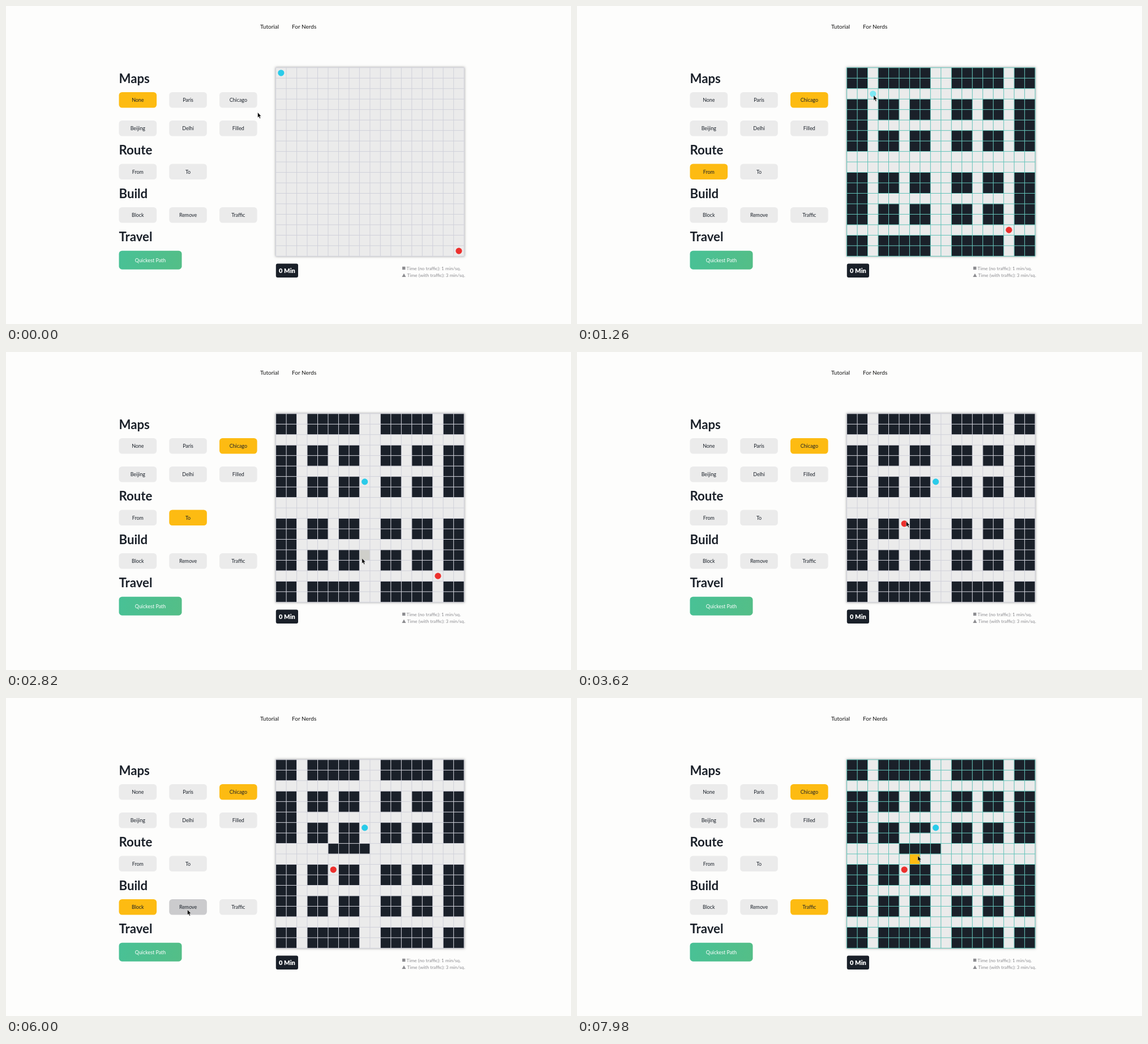
Recreate the animation shown at these times as an HTML page with a canvas. Size 998 px wide and 561 px high, loop 8 s.

```html
<!DOCTYPE html>
<html lang="en">
<head>
<meta charset="utf-8">
<title>Quickest path</title>
<style>
  html, body { margin: 0; width: 100%; height: 100%; overflow: hidden; background: #fdfdfc; }
  canvas { display: block; }
</style>
</head>
<body>
<canvas id="stage" width="998" height="561"></canvas>
<script>
const ctx = document.getElementById('stage').getContext('2d');
const LOOP = 8000;
const INK = '#1a2029', YELLOW = '#fdbb12', GRAY = '#ebebeb';
const BOARD = { x: 476.6, y: 108.8, cells: 18, cell: 18.475 };
const SIZE = BOARD.cells * BOARD.cell;

const headings = [['Maps', 136], ['Route', 262.4], ['Build', 338.8], ['Travel', 415.4]];
const rows = [
  [152, ['None', 'Paris', 'Chicago']],
  [202, ['Beijing', 'Delhi', 'Filled']],
  [278.5, ['From', 'To']],
  [355, ['Block', 'Remove', 'Traffic']]
];
const buttons = rows.flatMap(([y, names]) =>
  names.map((name, i) => ({ name, x: 199.5 + i * 88.75, y, w: 66.6, h: 27.6 })));

const MAP_CLICK = 520;
const tools = [
  { name: 'From', on: 960, press: 1240, release: 1960, off: 1960 },
  { name: 'To', on: 2560, press: 3020, release: 3560, off: 3560 },
  { name: 'Block', on: 4280, press: 4800, release: 5340, off: 6060 },
  { name: 'Remove', on: 6060, press: 6540, release: 6860, off: 7380 },
  { name: 'Traffic', on: 7380, press: 7900, release: LOOP, off: LOOP }
];

// Pointer stops: [arrive, leave, x, y]
const stops = [
  [0, 160, 444.6, 187.8], [420, 560, 412, 165], [880, 980, 233, 293],
  [1210, 1290, 524, 157.5], [1900, 2120, 632, 229], [2480, 2580, 321, 293],
  [2960, 3060, 763, 395], [3500, 3660, 581.6, 299], [4180, 4300, 232, 370],
  [4700, 4820, 577.5, 264.5], [5300, 5400, 634, 265], [5880, 6100, 320.5, 373.5],
  [6500, 6560, 596, 246], [6800, 6880, 615, 246], [7300, 7400, 410, 370],
  [7860, 7900, 594, 280], [7980, LOOP, 602, 278.5]
];

function pointerAt(t) {
  const i = stops.findLastIndex(s => s[0] <= t);
  const [, leave, x, y] = stops[i];
  const next = stops[i + 1];
  if (t <= leave || !next) return { x, y };
  const p = (t - leave) / (next[0] - leave);
  const e = p * p * (3 - 2 * p);
  return { x: x + (next[2] - x) * e, y: y + (next[3] - y) * e };
}

function cellAt({ x, y }) {
  const col = Math.floor((x - BOARD.x) / BOARD.cell);
  const row = Math.floor((y - BOARD.y) / BOARD.cell);
  const inside = Math.min(col, row) >= 0 && Math.max(col, row) < BOARD.cells;
  return inside ? { col, row } : null;
}

function isBuilding(col, row) {
  const avenue = n => [2, 8, 9, 15].includes(n);
  const alley = n => n === 5 || n === 12;
  const inner = n => n > 2 && n < 15;
  return !(avenue(col) || avenue(row) || alley(col) && inner(row) || alley(row) && inner(col));
}

const same = (a, b) => a && b && a.col === b.col && a.row === b.row;

// Replays every stroke up to time t.
function boardAt(t) {
  const loaded = t >= MAP_CLICK;
  const end = BOARD.cells - (loaded ? 3 : 1), begin = loaded ? 2 : 0;
  const state = { From: { col: begin, row: begin }, To: { col: end, row: end } };
  const grid = state.grid = Array.from({ length: BOARD.cells }, (_, row) =>
    Array.from({ length: BOARD.cells }, (_, col) => loaded && isBuilding(col, row) ? 'Block' : ''));
  for (const { name, press, release } of tools) {
    for (let s = press; s <= Math.min(t, release); s += 10) {
      const cell = cellAt(pointerAt(s));
      if (!cell) continue;
      const value = grid[cell.row][cell.col];
      if (name === 'From' || name === 'To') {
        if (!value) state[name] = cell;
      } else if (!same(cell, state.From) && !same(cell, state.To)) {
        if (name !== 'Traffic' || !value) grid[cell.row][cell.col] = name === 'Remove' ? '' : name;
      }
    }
  }
  return state;
}

function text(label, x, y, size, weight = 400, color = INK, align = 'left') {
  ctx.font = `${weight} ${size}px Lato, sans-serif`;
  ctx.textAlign = align;
  ctx.fillStyle = color;
  ctx.fillText(label, x, y);
}

function box(x, y, w, h, r, fill) {
  ctx.fillStyle = fill;
  ctx.beginPath();
  ctx.roundRect(x, y, w, h, r);
  ctx.fill();
}

function polygon(points, fill) {
  ctx.fillStyle = fill;
  ctx.beginPath();
  points.forEach(([x, y]) => ctx.lineTo(x, y));
  ctx.closePath();
  ctx.fill();
}

function drawPanel(t, pointer, tool) {
  text('Tutorial', 449, 40.2, 10, 400, '#111');
  text('For Nerds', 505, 40.2, 10, 400, '#111');
  headings.forEach(([label, y]) => text(label, 199.5, y, 22.2, 700));

  const map = t < MAP_CLICK ? 'None' : 'Chicago';
  for (const { name, x, y, w, h } of buttons) {
    const hover = pointer.x > x && pointer.x < x + w && pointer.y > y && pointer.y < y + h;
    const active = name === map || name === tool?.name;
    box(x, y, w, h, 5.5, active ? YELLOW : hover ? '#cbcbcd' : GRAY);
    text(name, x + w / 2, y + 17.2, 8.9, 400, INK, 'center');
  }

  const green = ctx.createLinearGradient(199, 432, 310, 465);
  green.addColorStop(0, '#48c196');
  green.addColorStop(1, '#54be87');
  box(199.5, 431.7, 111, 33, 5.5, green);
  text('Quickest Path', 255, 451.6, 8.9, 400, '#fff', 'center');

  box(476.8, 454.5, 39.2, 24.6, 3, INK);
  text('0 Min', 496.5, 471, 11.1, 900, '#fff', 'center');

  const muted = '#8c8c90';
  box(700, 459.8, 5.4, 5.4, 0, muted);
  polygon([[699.4, 478], [702.9, 471.8], [706.4, 478]], muted);
  text('Time (no traffic): 1 min/sq.', 707.6, 466, 8.32, 400, muted);
  text('Time (with traffic): 3 min/sq.', 708.6, 478, 8.32, 400, muted);
}

function drawBoard(state, pointer, tool, pressed) {
  const { x, y, cell, cells } = BOARD;
  ctx.save();
  ctx.shadowColor = 'rgba(0,0,0,.35)';
  ctx.shadowBlur = 4;
  box(x - .6, y - .6, SIZE + 1.2, SIZE + 1.2, 0, GRAY);
  ctx.restore();

  const hovered = cellAt(pointer);
  const fills = { Block: INK, Traffic: YELLOW };
  state.grid.forEach((line, row) => line.forEach((value, col) => {
    const here = { col, row };
    const free = !same(here, state.From) && !same(here, state.To);
    const hover = tool && !pressed && free && same(here, hovered);
    const fill = fills[value] || (hover ? '#cfcfca' : '');
    if (fill) box(x + col * cell, y + row * cell, cell, cell, 0, fill);
  }));

  ctx.strokeStyle = pressed ? '#62c3b9' : '#d0d1da';
  ctx.lineWidth = 1;
  ctx.beginPath();
  for (let i = 0; i <= cells; i++) {
    const d = i * cell;
    ctx.moveTo(x + d, y);
    ctx.lineTo(x + d, y + SIZE);
    ctx.moveTo(x, y + d);
    ctx.lineTo(x + SIZE, y + d);
  }
  ctx.stroke();

  const dot = (name, color, light) => {
    const { col, row } = state[name];
    ctx.fillStyle = pressed && tool.name === name ? light : color;
    ctx.beginPath();
    ctx.arc(x + (col + .5) * cell, y + (row + .5) * cell, 5.6, 0, 2 * Math.PI);
    ctx.fill();
  };
  dot('From', '#2acbe9', '#7ce8f4');
  dot('To', '#ec302d', '#f58a86');
}

function drawPointer({ x, y }) {
  const arrow = [[0, 0], [0, 9], [2, 7.2], [3.5, 10.7], [5, 10], [3.6, 6.7], [6.2, 6.6]]
    .map(([dx, dy]) => [x + dx, y + dy]);
  polygon(arrow, '#000');
  ctx.strokeStyle = 'rgba(255,255,255,.75)';
  ctx.lineWidth = .6;
  ctx.stroke();
}

function draw(now) {
  const t = now % LOOP;
  const pointer = pointerAt(t);
  const tool = tools.find(({ on, off }) => t >= on && t < off);
  const pressed = tool && t >= tool.press && t < tool.release;
  ctx.fillStyle = '#fdfdfc';
  ctx.fillRect(0, 0, 998, 561);
  drawPanel(t, pointer, tool);
  drawBoard(boardAt(t), pointer, tool, pressed);
  drawPointer(pointer);
  requestAnimationFrame(draw);
}
requestAnimationFrame(draw);
</script>
</body>
</html>
```
